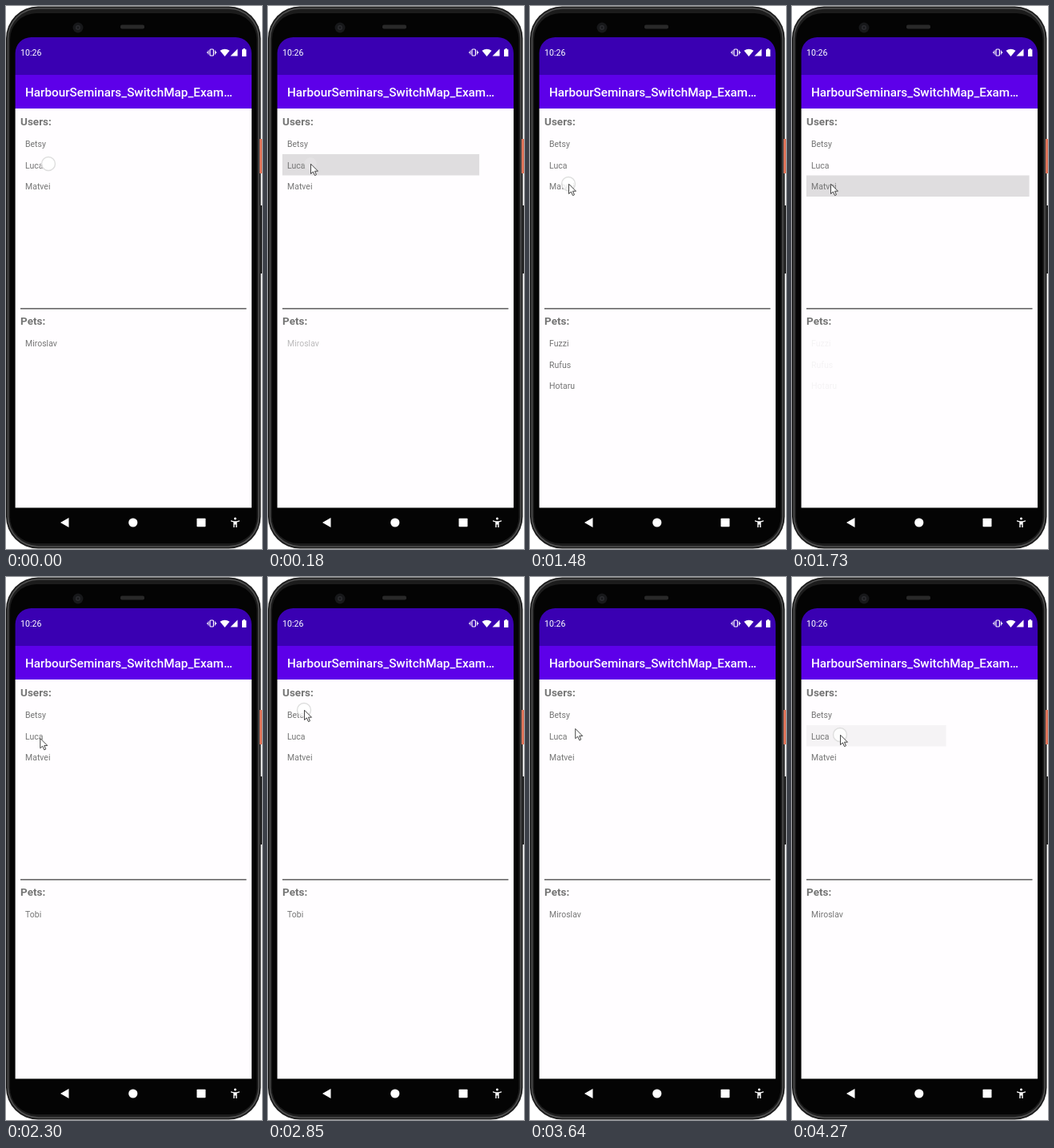
An HTML page that plays this animation: 320 by 678 pixels, repeating every 4300 ms.

```html
<!DOCTYPE html>
<html lang="en">
<head>
<meta charset="utf-8">
<title>Users and pets</title>
<style>
  html, body { margin: 0; width: 100%; height: 100%; overflow: hidden; background: #fff; }
  svg { display: block; width: 320px; height: 678px; }
  text { font-family: Roboto, "Noto Sans", sans-serif; fill: #757575; font-size: 10.5px; }
  .head { font-size: 13.5px; font-weight: 700; }
  .bar { fill: #fff; font-size: 15.28px; font-weight: 500; }
  .clock { fill: #fff; font-size: 10.6px; }
</style>
</head>
<body>
<svg viewBox="0 0 320 678">
  <defs>
    <clipPath id="screen"><path d="M11.600 626.400V59a20 20 0 0 1 20-20H287a20 20 0 0 1 20 20V626.400Z"/></clipPath>
  </defs>

  <!-- phone -->
  <rect y="0.5" width="318.5" height="677" rx="40" fill="#1c1c1c"/>
  <rect x="2.5" y="3" width="313.5" height="672" rx="38" fill="none" stroke="#505050" stroke-width="1.5"/>
  <rect x="5" y="9" width="308.5" height="662" rx="33" fill="#040404"/>
  <rect x="317" y="166" width="3" height="43" fill="#de745a"/>
  <rect x="317" y="249" width="3" height="85" fill="#242424"/>
  <g fill="#17181a">
    <circle cx="90" cy="27" r="6.5"/>
    <circle cx="90" cy="27" r="2.2" stroke="#2b2c30" stroke-width="1.5"/>
    <rect x="143" y="23.5" width="30" height="5" rx="2" fill="#292929"/>
  </g>

  <!-- screen -->
  <g clip-path="url(#screen)">
    <rect x="11" y="39" width="297" height="47" fill="#3a00b2"/>
    <rect x="11" y="86" width="297" height="42" fill="#5d00e9"/>
    <rect x="11" y="128" width="297" height="499" fill="#fffdff"/>
  </g>
  <text class="clock" x="18" y="62">10:26</text>
  <text class="bar" x="24" y="113">HarbourSeminars_SwitchMap_Exam…</text>
  <g fill="#fff">
    <rect x="255" y="54" width="4.4" height="8" rx="1" fill="none" stroke="#fff" stroke-width="1.2"/>
    <path d="M253 55.5v5M261.4 55.5v5M251.8 57v2M262.6 57v2" stroke="#fff"/>
    <path d="M267.5 55.8Q273.5 51.5 279.5 55.8L273.5 63Z"/>
    <path d="M280.5 62.5H289.5V53.5Z"/>
    <path d="M295 54.2h1.5v-1.2h2.4v1.2h1.5v8.8h-5.4Z"/>
    <path d="M68 645L78.500 639V651Z"/>
    <circle cx="158.8" cy="645" r="5.6"/>
    <rect x="238.5" y="639.8" width="11" height="10.4" rx=".8"/>
    <circle cx="286.5" cy="640" r="1.5"/>
    <path d="M281 642.2L284.8 643.2H288.2L292 642.2V643.4L288.7 644.5V651H287.3V647.6H285.7V651H284.3V644.5L281 643.4Z"/>
  </g>
  <rect id="ripple" x="18" height="26.5"/>
  <path d="M18 377.800H300.500" stroke="#3c3c3c" stroke-width="1.2"/>
  <text class="head" x="18" y="149">Users:</text>
  <text class="head" x="18" y="398">Pets:</text>
  <g id="lists"></g>
  <circle id="touch" r="8.5" fill="#fff" fill-opacity=".8" stroke="#dedede" stroke-width="1.4"/>
  <path id="arrow" d="M0 0V12.300L2.900 9.700L5 14.400L7 13.500L5 9H9Z" fill="#fff" stroke="#444" stroke-linejoin="round"/>
</svg>
<script>
const LOOP = 4300, ROW = 26.5, FADE = 120, SWAP = 260;
const [ripple, lists, touch, arrow] = ["ripple", "lists", "touch", "arrow"]
  .map(id => document.getElementById(id));

const people = [
  { name: "Betsy", pets: ["Miroslav"] },
  { name: "Luca", pets: ["Fuzzi", "Rufus", "Hotaru"] },
  { name: "Matvei", pets: ["Tobi"] }
];

// Each tap picks the next user in turn, starting with the second
const taps = [
  { at: -20, x: 53, y: 197 },
  { at: 1480, x: 48, y: 222 },
  { at: 2850, x: 45, y: 166 },
  { at: 4180, x: 60, y: 197 }
];

// Pointer travel from one tap to the next; bow bends the path sideways
const moves = [
  { start: 820, end: 970, power: 2, bow: 0 },
  { start: 2180, end: 2610, power: 1.4, bow: -5 },
  { start: 3390, end: 3790, power: 1.4, bow: 0 }
];

const ramp = (t, a, b) => Math.min(1, Math.max(0, (t - a) / (b - a)));

function set(node, attrs) {
  for (const key in attrs) node.setAttribute(key, attrs[key]);
}

function addList(names, top) {
  const g = document.createElementNS("http://www.w3.org/2000/svg", "g");
  names.forEach((name, i) => {
    const text = document.createElementNS(g.namespaceURI, "text");
    set(text, { x: 24, y: top + i * ROW });
    text.textContent = name;
    g.append(text);
  });
  lists.append(g);
  return g;
}

addList(people.map(p => p.name), 176.3);
const petLists = people.map(p => addList(p.pets, 425.4));

function drawTap(t) {
  const i = taps.findLastIndex(p => p.at <= t);
  const { at, x, y } = taps[i], age = t - at;
  const row = (i + 1) % people.length;
  set(ripple, {
    y: 158.5 + row * ROW,
    width: Math.min(282.5, 174 + 0.65 * Math.max(0, age - 90)),
    opacity: 0.125 * ramp(age, 70, 140) * (1 - ramp(age, 280, 490))
  });
  set(touch, { cx: x, cy: y, opacity: 1 - ramp(age, 130, 220) });

  // The old list fades out, then the new one fades in
  const shown = age < SWAP ? i % people.length : row;
  const opacity = Math.min(1, Math.abs(age - SWAP) / FADE);
  petLists.forEach((g, n) => set(g, { opacity: n === shown ? opacity : 0 }));
}

function drawArrow(t) {
  let { x, y } = taps[0];
  moves.forEach(({ start, end, power, bow }, i) => {
    const k = 1 - (1 - ramp(t, start, end)) ** power;
    x += (taps[i + 1].x - taps[i].x) * k + bow * Math.sin(Math.PI * k);
    y += (taps[i + 1].y - taps[i].y) * k;
  });
  set(arrow, { transform: `translate(${x + 0.5} ${y + 0.2})`, opacity: t < 30 ? 0 : 1 });
}

const begin = performance.now();
function tick() {
  const t = (performance.now() - begin) % LOOP;
  drawTap(t);
  drawArrow(t);
  requestAnimationFrame(tick);
}
tick();
</script>
</body>
</html>
```
